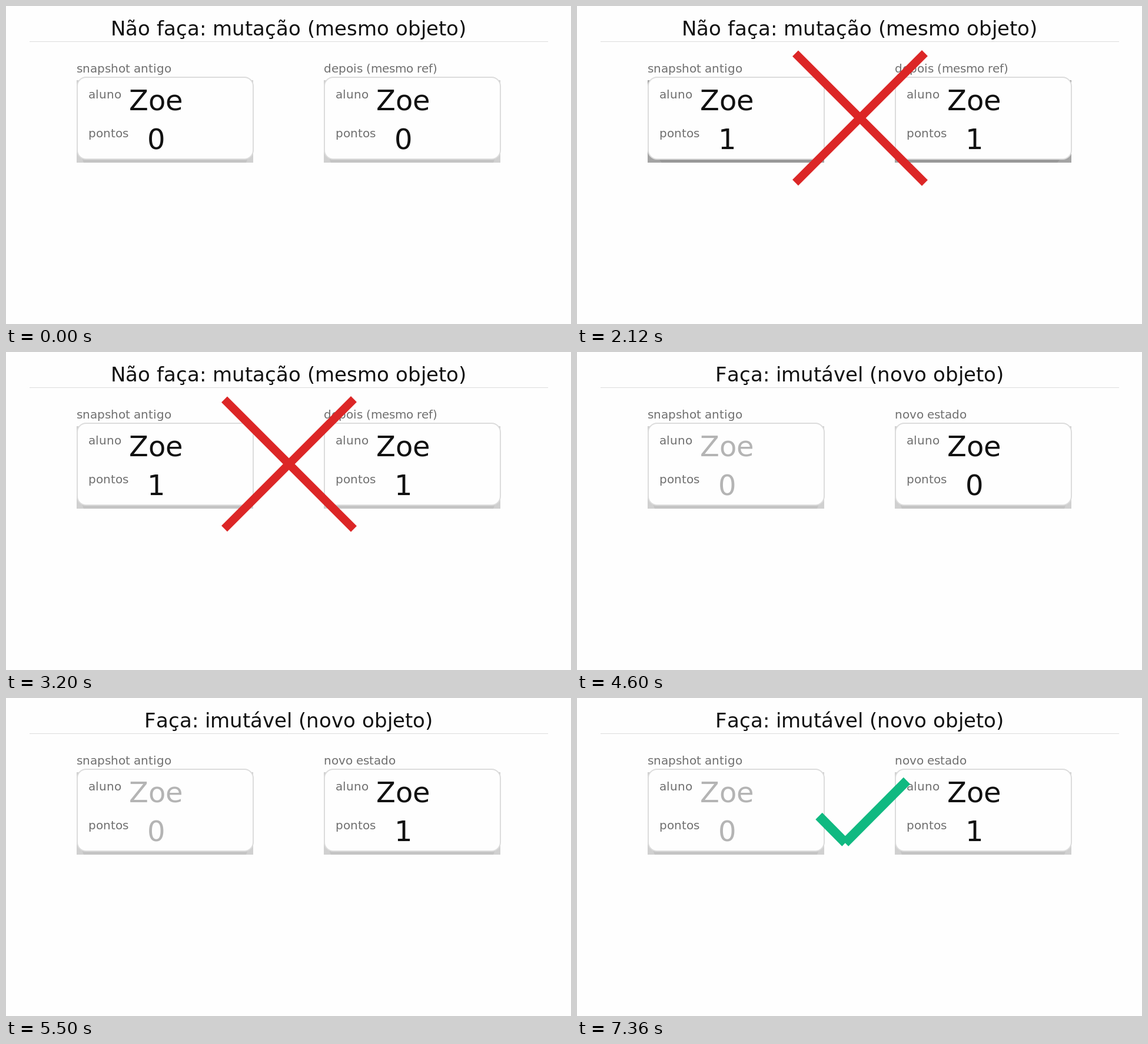
These frames come from a looping animation (960x540 px, 8 s). An HTML page with a canvas:

```html
<!DOCTYPE html>
<html lang="pt">
<head>
<meta charset="utf-8">
<style>
  html, body { margin: 0; height: 100%; overflow: hidden; background: #fefefe; }
  canvas { display: block; }
</style>
</head>
<body>
<canvas id="stage" width="960" height="540"></canvas>
<script>
const ctx = document.getElementById('stage').getContext('2d');
const INK = '#111', MUTED = '#707070', FADED = '#b4b4b4', RULE = '#dcdcdc';
const LOOP = 8000;

// Sets text without kerning, each glyph on a whole pixel
function text(str, x, y, size, color, centered) {
  ctx.font = `${size}px "DejaVu Sans", sans-serif`;
  ctx.fillStyle = color;
  const glyphs = [...String(str)];
  const advance = glyph => Math.round(ctx.measureText(glyph).width);
  if (centered) x = Math.round(x - glyphs.reduce((sum, g) => sum + advance(g), 0) / 2);
  for (const glyph of glyphs) {
    ctx.fillText(glyph, x, y);
    x += advance(glyph);
  }
}

function line(x1, y1, x2, y2, width, color) {
  ctx.beginPath();
  ctx.moveTo(x1, y1);
  ctx.lineTo(x2, y2);
  ctx.lineWidth = width;
  ctx.strokeStyle = color;
  ctx.stroke();
}

// Clipped drop shadow: a flat block with differently shaded lower corners
function shadow(x, deep) {
  const inset = deep ? 24 : 12, slant = inset / 5;
  ctx.fillStyle = deep ? '#a4a4a4' : '#d0d0d0';
  ctx.fillRect(x, 126, 300, 140);
  ctx.fillStyle = deep ? '#989898' : '#c4c4c4';
  ctx.beginPath();
  ctx.moveTo(x + inset - slant, 260);
  ctx.lineTo(x + inset, 266);
  ctx.lineTo(x + 300 - inset, 266);
  ctx.lineTo(x + 300 - inset + slant, 260);
  ctx.fill();
}

function card(x, label, points, color, deep) {
  text(label, x, 113, 20, MUTED);
  shadow(x, deep);
  ctx.beginPath();
  ctx.roundRect(x + 1, 121, 299, 139, 15);
  ctx.fillStyle = '#fefefe';
  ctx.fill();
  ctx.lineWidth = 2;
  ctx.strokeStyle = RULE;
  ctx.stroke();
  text('aluno', x + 20, 157, 20, MUTED);
  text('pontos', x + 20, 223, 20, MUTED);
  text('Zoe', x + 135, 177, 48, color, true);
  text(points, x + 135, 243, 48, color, true);
}

function cross() {
  line(371, 80.5, 591, 300.5, 14, '#dc2626');
  line(591, 80, 371, 300, 14, '#dc2626');
}

function check() {
  line(411, 200.5, 456, 246, 16, '#10b981');
  line(455.5, 246, 560.5, 140.5, 16, '#10b981');
}

function draw(t) {
  const immutable = t >= 4600;
  const mutated = t >= 500 && !immutable;
  const deep = mutated && t < 3200;

  ctx.fillStyle = '#fefefe';
  ctx.fillRect(0, 0, 960, 540);
  text(immutable ? 'Faça: imutável (novo objeto)' : 'Não faça: mutação (mesmo objeto)',
    480, 50, 34, INK, true);
  line(40, 60.5, 921, 60.5, 1, RULE);

  card(120, 'snapshot antigo', mutated ? 1 : 0, immutable ? FADED : INK, deep);
  card(540, immutable ? 'novo estado' : 'depois (mesmo ref)',
    mutated || t >= 5500 ? 1 : 0, INK, deep);

  if (mutated) cross();
  if (t >= 6400) check();
}

const start = performance.now();
function frame() {
  draw((performance.now() - start) % LOOP);
  requestAnimationFrame(frame);
}
frame();
</script>
</body>
</html>
```
